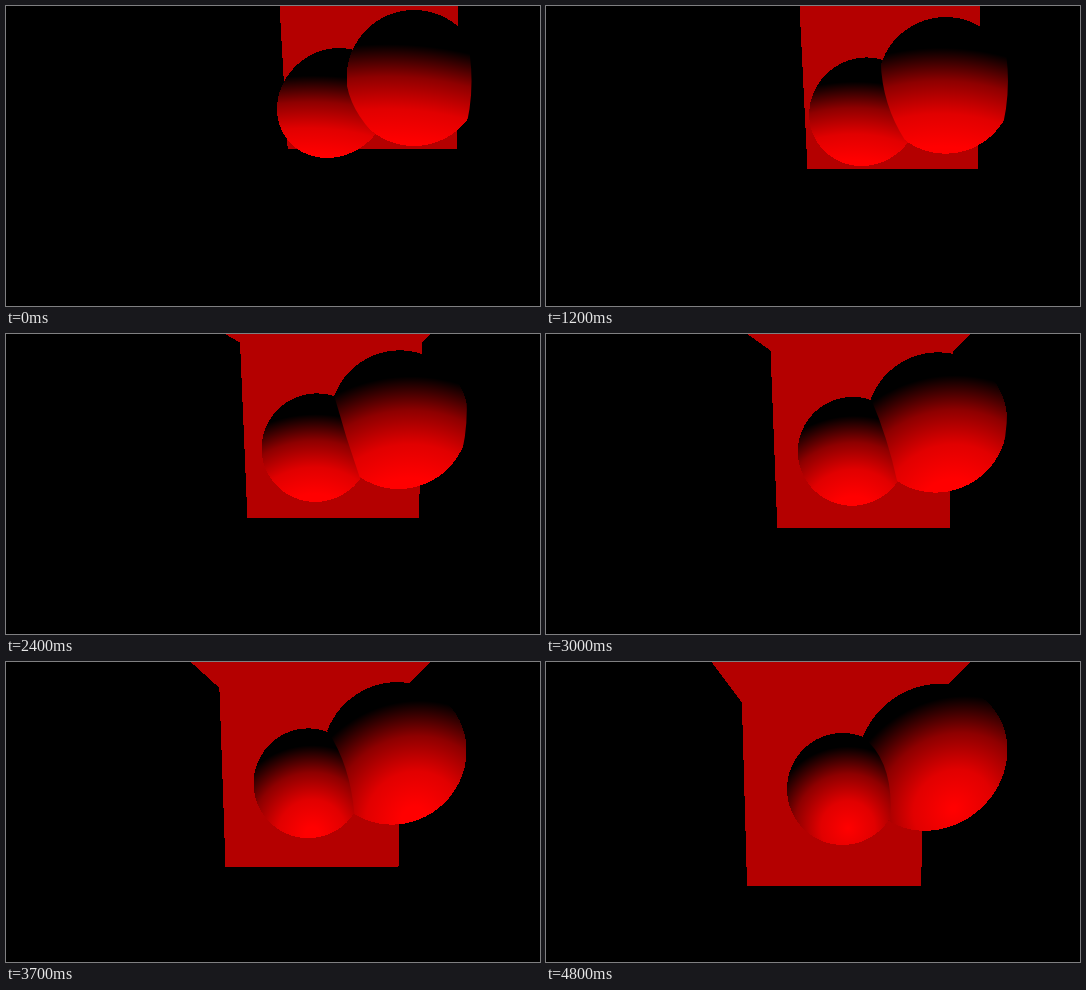
An HTML page that plays this animation: 534x300 px, repeating every 4900 ms.

```html
<!DOCTYPE html>
<html lang="en">
<head>
<meta charset="utf-8">
<title>Two spheres</title>
<style>
  html, body { margin: 0; width: 100%; height: 100%; overflow: hidden; background: #000; }
  svg { display: block; }
</style>
</head>
<body>
<svg width="534" height="300" viewBox="0 0 534 300" shape-rendering="crispEdges">
  <defs>
    <radialGradient id="smallShade" gradientUnits="userSpaceOnUse">
      <stop stop-color="#f00"/>
      <stop stop-color="#e10000"/>
      <stop stop-color="#8e0000"/>
      <stop stop-color="#000"/>
    </radialGradient>
    <radialGradient id="bigShade" gradientUnits="userSpaceOnUse">
      <stop stop-color="#f00"/>
      <stop stop-color="#e10000"/>
      <stop stop-color="#8e0000"/>
      <stop stop-color="#000"/>
    </radialGradient>
    <clipPath id="cut"><path id="cutPath"/></clipPath>
  </defs>
  <rect width="534" height="300"/>
  <polygon id="wall" fill="#b40000"/>
  <circle id="small" r="1" fill="url(#smallShade)"/>
  <g clip-path="url(#cut)"><circle id="big" r="1" fill="url(#bigShade)"/></g>
</svg>
<script>
const STEP = 100, STEPS = 49;
const $ = id => document.getElementById(id);

// Moves from a to b; a positive lead runs ahead of the straight line.
const glide = (p, a, b, lead = 0) => a + (b - a) * (p + lead * p * (1 - p));

function drawWall(n) {
  const floor = 143.3 + 1.675 * n;
  const points = [
    [125, -54],
    [272.2 - 1.59 * n, -23.5 + 1.335 * n],
    [281.7 - 1.68 * n, floor],
    [451.3 - 1.59 * n, floor],
    [452 - 1.5 * n, -28 + 1.5 * n],
    [480, -56]
  ];
  $('wall').setAttribute('points', points.join(' '));
}

// Lean shears the ellipse so that its top moves sideways.
function placeSphere(id, cx, cy, rx, ry, lean) {
  const width = Math.sqrt(rx * rx - lean * lean);
  $(id).setAttribute('transform', `matrix(${width} 0 ${-lean} ${ry} ${cx} ${cy})`);
}

function drawSpheres(p) {
  const dip = 5 * p * (1 - p);
  placeSphere('small',
    glide(p, 327, 296.5, 0.22), glide(p, 97, 127, 0.22),
    glide(p, 56, 55.5) - dip, glide(p, 55, 56) - dip, 6 * (1 - p) ** 3);
  placeSphere('big',
    glide(p, 408, 386.5, 0.75), glide(p, 72, 95.3, 0.35),
    glide(p * p, 67.5, 75), glide(p * p, 68, 73.5), 7.5 * p ** 4);
}

// The big sphere ends at the seam on the left and at a side wall on the right.
function drawCut(n, p) {
  const x0 = glide(p, 341, 316), y0 = glide(p, 48, 74, 0.25);
  const mx = glide(p, 343, 339.5, 1), my = glide(p, 88, 108, 1);
  const x1 = glide(p, 365, 344, 0.15), y1 = glide(p, 125, 158, 0.2);
  const side = 465.5 - 0.4 * n + 0.0085 * n * n;
  $('cutPath').setAttribute('d',
    `M0 0V${y0}H${x0}Q${2 * mx - (x0 + x1) / 2} ${2 * my - (y0 + y1) / 2} ${x1} ${y1}` +
    `H0V300H${side - 8}V130Q${side + 7} 80 ${side - 6} 25V0Z`);
}

// Shading in sphere units: a distant glow below that comes nearer.
function drawShade(id, p, aside) {
  const shade = $(id);
  const x = glide(p, -0.4, aside, 1);
  const y = 0.7 + 4.3 * (1 - p) ** 2;
  const reach = Math.hypot(x, y);
  const radius = reach + glide(p, 0.48, 0.75);
  const inner = Math.max(0, reach - glide(p, 0.95, 0.75)) / radius;
  shade.setAttribute('cx', x);
  shade.setAttribute('cy', y);
  shade.setAttribute('r', radius);
  [...shade.children].forEach((stop, i) => stop.setAttribute('offset', glide(i / 3, inner, 1)));
}

function render(ms) {
  const n = Math.floor(ms / STEP) % STEPS;
  const p = n / (STEPS - 1);
  drawWall(n);
  drawSpheres(p);
  drawCut(n, p);
  drawShade('smallShade', p, 0.1);
  drawShade('bigShade', p, 0.35);
}

const start = performance.now();
function tick() {
  render(performance.now() - start);
  requestAnimationFrame(tick);
}
tick();
</script>
</body>
</html>
```
